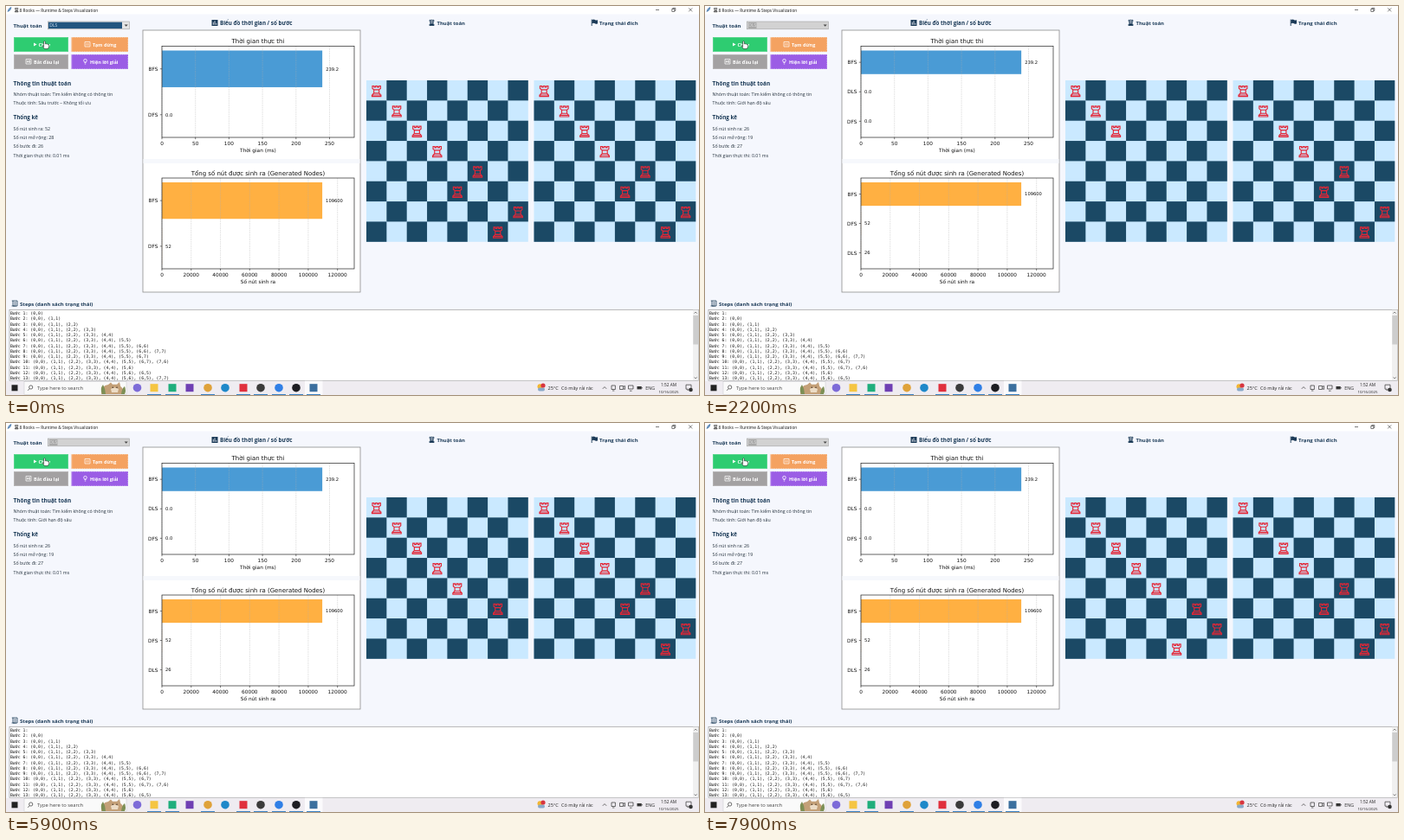
Write an HTML page that moves like this. It is 800 by 450 pixels and loops after 8000 ms.

```html
<!DOCTYPE html>
<html lang="vi">
<head>
<meta charset="utf-8">
<title>8 Rooks</title>
<style>
  html, body { margin: 0; width: 100%; height: 100%; overflow: hidden; background: #f5f7fd; }
  svg { display: block; width: 100vw; height: 100vh; }
  text { white-space: pre; }
  .ui { font-family: "Open Sans", "Noto Sans", sans-serif; }
  .plot { font-family: "DejaVu Sans", sans-serif; }
  .mono { font-family: "DejaVu Sans Mono", "Noto Sans Mono", monospace; }
</style>
</head>
<body>
<svg id="stage" viewBox="0 0 800 450" xmlns="http://www.w3.org/2000/svg"></svg>
<script>
const LOOP = 8000;
const NAVY = '#1b3a57';
const CELL = 23.35;
const GOAL = '01235476';
// Moments at which the search shows its next state.
const MOVES = [1000, 1400, 1900, 2400, 2800, 3300, 3900, 4400, 4800, 5300, 5700, 6300, 6700, 7200, 7700];

const rect = (x, y, w, h, fill, extra = '') =>
  `<rect x="${x}" y="${y}" width="${w}" height="${h}" fill="${fill}" ${extra}/>`;
const dot = (x, y, r, fill, extra = '') => `<circle cx="${x}" cy="${y}" r="${r}" fill="${fill}" ${extra}/>`;
const path = (d, stroke, width = 1, fill = 'none', extra = '') =>
  `<path d="${d}" stroke="${stroke}" stroke-width="${width}" fill="${fill}" ${extra}/>`;
const text = (x, y, size, str, fill = '#222', extra = '', cls = 'ui') =>
  `<text class="${cls}" x="${x}" y="${y}" font-size="${size}" fill="${fill}" ${extra}>${str}</text>`;
const bold = (x, y, size, str, fill = NAVY) => text(x, y, size, str, fill, 'font-weight="700"');
const plot = (x, y, size, str, anchor = 'middle') =>
  text(x, y, size, str, '#111', `text-anchor="${anchor}"`, 'plot');
const at = (x, y, body, scale = 1) => `<g transform="translate(${x} ${y}) scale(${scale})">${body}</g>`;

// States in the order in which a depth-first search meets them; digit r is the column in row r.
const states = [];
(function visit(s) {
  if (states.length > MOVES.length) return;
  states.push(s);
  for (const c of '01234567') if (!s.includes(c)) visit(s + c);
})('');

function rook(color, width) {
  return path('M-4.7-5.8h2v1.4h1.7v-1.4h2v1.4h1.7v-1.4h2v3l-1.7 1.4v4l1.3 1.2v1h.9v1.6h-10.4v-1.6h.9v-1l1.3-1.2v-4l-1.7-1.4z' +
    'M-3-1.4h6M-3 2.6h6M-4.3 4.7h8.6', color, width);
}

function rooks(x, cols) {
  return [...cols].map((c, r) =>
    at(x + (+c + .5) * CELL, 86 + (r + .5) * CELL + .6, rook('#e32636', 1.15))).join('');
}

function board(x) {
  let out = rect(x, 86, CELL * 8, CELL * 8, '#cae9ff');
  for (let r = 0; r < 8; r++)
    for (let c = 0; c < 8; c++)
      if ((r + c) % 2) out += rect(x + c * CELL, 86 + r * CELL, CELL, CELL, '#1b4965');
  return out;
}

function axes({ y, h, title, label, unit, step, ticks, color, rows }) {
  const x0 = 180, w = 222, pitch = (h - 10) / (rows.length - .2);
  let out = plot(291, y - 3.4, 6.95, title);
  rows.forEach(([name, value], i) => {
    const cy = y + 5 + pitch * (i + .4);
    out += rect(x0, cy - pitch * .4, value * unit, pitch * .8, color);
    out += path(`M${x0 - 2.2} ${cy}h2.2`, '#222', .6);
    out += plot(x0 - 4.5, cy + 2.2, 5.8, name, 'end');
    out += plot(x0 + value * unit + 4, cy + 1.8, 5.2, value < 1 ? '0.0' : value, 'start');
  });
  for (let i = 0; i < ticks; i++) {
    const x = x0 + i * step * unit;
    out += path(`M${x} ${y}v${h}`, '#b0b0b0', .5, 'none', 'stroke-dasharray="1.8 .8" opacity=".7"');
    out += path(`M${x} ${y + h}v2.2`, '#222', .6);
    out += plot(x, y + h + 8.8, 5.8, i * step);
  }
  out += rect(x0, y, w, h, 'none', 'stroke="#222" stroke-width=".7"');
  return out + plot(291, y + h + 16.7, 5.8, label);
}

function charts(done) {
  const time = [['BFS', 239.2], ['DFS', .01]];
  const nodes = [['BFS', 109600], ['DFS', 52]];
  if (done) {
    time.splice(1, 0, ['DLS', .01]);
    nodes.push(['DLS', 26]);
  }
  return axes({ y: 46.5, h: 105.5, title: 'Thời gian thực thi', label: 'Thời gian (ms)',
    unit: .774, step: 50, ticks: 6, color: '#4a9bd5', rows: time }) +
    axes({ y: 199, h: 105, title: 'Tổng số nút được sinh ra (Generated Nodes)', label: 'Số nút sinh ra',
      unit: .001689, step: 20000, ticks: 7, color: '#ffb042', rows: nodes });
}

function log(list) {
  return list.slice(0, 13).map((s, i) => {
    const cells = [...s].map((c, r) => `(${r},${c})`).join(', ');
    return text(5, 357.2 + i * 6.24, 4.83, `Bước ${i + 1}: ${cells}`, '#111', '', 'mono');
  }).join('');
}

function combo(started) {
  const box = rect(48.3, 18, 94, 8.8, started ? '#d2d2d2' : '#e4e4e4', 'stroke="#a0a0a0" stroke-width=".6"');
  const mark = started ? rect(50, 19, 9.5, 7, '#a9a9a9') : rect(49, 18.7, 85, 7.4, '#20547f');
  return box + mark + text(50.3, 24.4, 5, 'DLS', started ? '#dedede' : '#d5e6f5') +
    path('M136.7 21.4h4l-2 2.3z', 'none', 0, '#444');
}

function info(started) {
  const [kind, made, grown, moves] = started
    ? ['Giới hạn độ sâu', 26, 19, 27]
    : ['Sâu trước – Không tối ưu', 52, 28, 26];
  const lines = [[103.7, 'Nhóm thuật toán: Tìm kiếm không có thông tin'], [114, `Thuộc tính: ${kind}`],
    [143.6, `Số nút sinh ra: ${made}`], [153.9, `Số nút mở rộng: ${grown}`],
    [164.2, `Số bước đi: ${moves}`], [174.5, 'Thời gian thực thi: 0.01 ms']];
  return lines.map(([y, s]) => text(8.5, y, 5.28, s, '#24313c')).join('');
}

function titleBar() {
  return rect(0, 0, 800, 9.5, '#fff') +
    path('M2 6.5Q3 2 6 1.5Q6 5 2 6.5', '#31659c', .6, '#7fa8d0') +
    at(12.2, 4.6, rook('#222', 1.6), .36) +
    text(15.5, 6.6, 4.78, '8 Rooks — Runtime &amp; Steps Visualization', '#111') +
    path('M750 4.5h4M788.2 2.4l4 4m0-4l-4 4', '#222', .6) +
    path('M768.8 3.4h3v3h-3zM769.8 3.4v-1h3v3h-1', '#222', .6);
}

function button(x, y, w, fill, tx, label) {
  return rect(x, y, w, 17, fill) +
    rect(x + .5, y + .5, w - 1, 16, 'none', 'stroke="#fff" stroke-width=".6" stroke-dasharray="1 1" opacity=".65"') +
    bold(tx, y + 10.5, 5.5, label, '#fff');
}

function controls() {
  return button(9, 36, 63, '#2ecc71', 37.5, 'Chạy') +
    button(75.5, 36, 65.5, '#f4a261', 100, 'Tạm dừng') +
    button(9, 56, 63, '#a3a1a2', 32, 'Bắt đầu lại') +
    button(75.5, 56, 65.5, '#9b5de5', 97, 'Hiện lời giải') +
    path('M32 42.4v4l3.6-2z', 'none', 0, '#fff') +
    path('M91 41.5h6v5.5h-6zM93 43v2.5M95 43v2.5M23 61.5h6v5.5h-6zM27.5 63v2.5l-2.5-1.2zM24.4 63v2.5', '#fff', .7) +
    dot(91.5, 63.2, 1.8, 'none', 'stroke="#fff" stroke-width=".8"') +
    path('M90.6 65.5h1.8M90.8 67h1.4', '#fff', .8);
}

function headings() {
  return bold(8.5, 25.2, 6, 'Thuật toán') +
    bold(8.5, 92.3, 6.45, 'Thông tin thuật toán') +
    bold(8.5, 131.3, 6.3, 'Thống kê') +
    bold(247, 21.6, 6.25, 'Biểu đồ thời gian / số bước') +
    bold(497.5, 21.6, 5.9, 'Thuật toán') +
    bold(685, 21.6, 6, 'Trạng thái đích') +
    bold(16, 346.6, 6.05, 'Steps (danh sách trạng thái)') +
    rect(237.5, 16, 7, 7, NAVY) + path('M239.3 21.8v-3M241 21.8v-4.6M242.8 21.8v-2', '#f5f7fd', .8) +
    at(491.5, 19.2, rook(NAVY, 2), .5) +
    path('M676.2 15.5v7.5', NAVY, .9) + path('M676.5 16q2-1 3.5 0t3 0v4.2q-1.5 1-3 0t-3.5 0z', 'none', 0, NAVY) +
    path('M8 341h5v6h-5zM9.3 343h2.5M9.3 345h2.5M6.6 347h5M6.8 341h1.2', NAVY, .8);
}

function logBox() {
  return rect(4, 351.3, 795.5, 82, '#fff', 'stroke="#9a9a9a" stroke-width=".7"') +
    rect(793, 351.7, 6.3, 81.3, '#f0f0f0') + rect(793.3, 358, 5.7, 33.5, '#cdcdcd') +
    path('M794.6 355.6l1.5-1.6 1.5 1.6M794.6 429.4l1.5 1.6 1.5-1.6', '#555', .7);
}

function cat() {
  return path('M110 449q0-10 8-11l3-2.5 2 2.2h5l3-2.7 1.2 5q4 3 5 9z', 'none', 0, '#c4a078') +
    path('M111 449q-3-6 1-11 3 5 3 11zM133 449q1-7 4-9 2 5 0 9z', 'none', 0, '#7d8f55') +
    path('M121 443q4-3 9 0l-1 4h-7z', 'none', 0, '#ecdcc6') +
    dot(123.3, 441.2, .7, '#3a2c22') + dot(128, 441.2, .7, '#3a2c22');
}

function taskbar() {
  const running = [171, 192, 233, 274, 294, 315, 335, 355];
  const squares = [[171, '#f5c542'], [192, '#1fae7c'], [212, '#6f3fb3'], [274, '#e02f3c'], [355, '#3b6f9e']];
  const circles = [[151.5, '#7d6bd8'], [233, '#dfa23a'], [253, '#1e88c9'], [294, '#3b3b3b'], [315, '#2f7fe6'], [335, '#1d1d22']];
  return rect(0, 433.8, 800, 16.2, '#efecf1') +
    rect(6.5, 438.3, 7, 7, '#222') +
    rect(21, 434.3, 118, 15.4, '#fafafa', 'stroke="#c8c8cc" stroke-width=".5"') +
    dot(28.7, 441, 2.1, 'none', 'stroke="#333" stroke-width=".7"') + path('M27.2 442.6l-2 2.2', '#333', .7) +
    text(36, 444, 5.8, 'Type here to search', '#444') + cat() +
    rect(345, 433.8, 20.5, 16.2, '#fbfafc') +
    running.map(x => rect(x - 8, 449, 16, 1, '#3b82c4')).join('') +
    squares.map(([x, c]) => rect(x - 4.5, 437.2, 9, 9, c)).join('') +
    circles.map(([x, c]) => dot(x, 441.7, 4.8, c)).join('') +
    dot(616.5, 440.2, 3, '#f3b631') + rect(614, 441.5, 8, 4, '#8aa9c9', 'rx="2"') + dot(620, 439, 2.6, '#d8343f') +
    text(625.5, 443.9, 5.6, '25°C') + text(641, 443.9, 5.55, 'Có mây rải rác') +
    path('M688.8 442.8l2.2-2.2 2.2 2.2', '#333', .7) +
    path('M699 439h4.4v4.5h-4.4zM700 445h2.4M708.5 439.5h4v4h-4zm4 1l2-1v4l-2-1M718.5 439h5.5v4h-5.5zM720 445.2h2.6', '#333', .7) +
    rect(728.5, 440, 5.2, 3.4, '#333') + path('M734.3 441v1.4', '#333', .7) +
    text(738.3, 443.7, 5.3, 'ENG') +
    text(765, 439.6, 4.75, '1:52 AM', '#222', 'text-anchor="middle"') +
    text(765, 447.6, 4.35, '10/16/2025', '#222', 'text-anchor="middle"') +
    path('M785 438.2h6v5h-2.5l-1.5 1.5v-1.5h-2z', '#333', .7) + dot(790.5, 444, 2.3, '#333');
}

const layer = id => `<g id="${id}"></g>`;
const stage = document.getElementById('stage');
stage.innerHTML = rect(0, 0, 800, 450, '#f5f7fd') + titleBar() + headings() + controls() +
  rect(158, 28, 251, 303, '#fff', 'stroke="#8c8c8c" stroke-width=".8"') +
  rect(158.5, 177, 250, 5, '#f6f8fc') +
  board(416) + board(609.5) + rooks(609.5, GOAL) + logBox() +
  ['combo', 'info', 'charts', 'log', 'pieces'].map(layer).join('') + taskbar() +
  path('M43.6 47.2v-6q.9-1.2 1.7 0v2.6q1-.6 1.4.2 1-.5 1.4.4 1.1-.3 1.2.7v2.6l-1 1.9h-3.8l-2.3-3.2q.3-1 1.4.8z', '#111', .55, '#fff');

const shown = {};
function put(id, key, draw) {
  if (shown[id] === key) return;
  shown[id] = key;
  document.getElementById(id).innerHTML = draw();
}

function update(t) {
  const started = t >= 100, done = t >= 200;
  const cols = done ? states[MOVES.filter(m => m <= t).length] : GOAL;
  put('combo', started, () => combo(started));
  put('info', started, () => info(started));
  put('charts', done, () => charts(done));
  put('log', done, () => log(done ? states : states.slice(1)));
  put('pieces', cols, () => rooks(416, cols));
}

const start = performance.now();
function tick() {
  update((performance.now() - start) % LOOP);
  requestAnimationFrame(tick);
}
tick();
</script>
</body>
</html>
```
